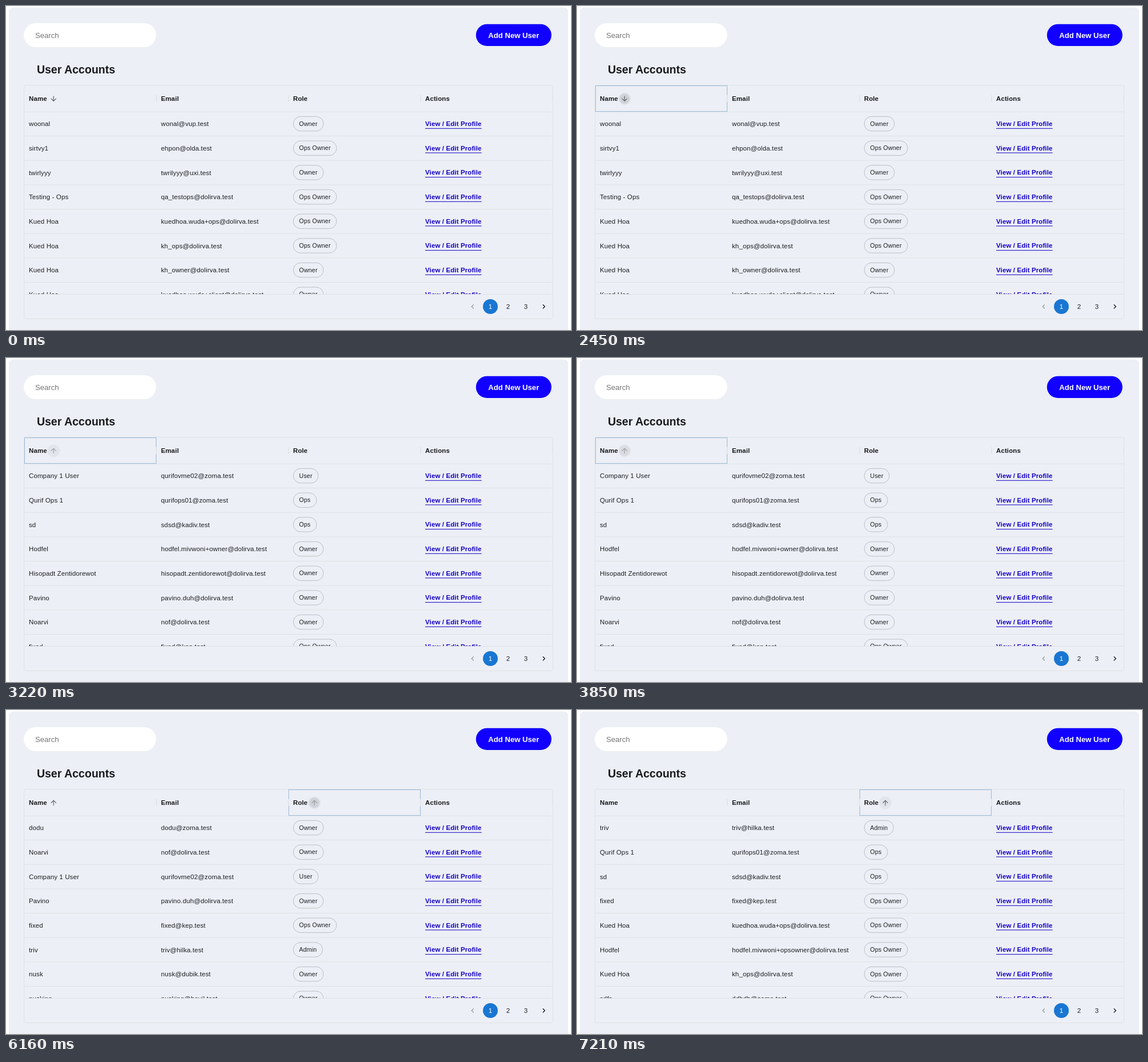
These frames come from a looping animation (988x567 px, 8 s). An HTML page:

```html
<!DOCTYPE html>
<html lang="en">
<head>
<meta charset="utf-8">
<title>User Accounts</title>
<style>
  html, body { margin: 0; width: 100%; height: 100%; overflow: hidden; background: #fff; }
  svg { display: block; width: 988px; height: 567px; }
  text { font: 11.49px "Liberation Sans", Arial, sans-serif; letter-spacing: .123px; fill: #1d1f22; }
  .bold { font-weight: 700; fill: #17191c; }
  .plain { letter-spacing: 0; }
  .title { font-size: 19.5px; }
  .large { font-size: 13.13px; }
  .label { font-size: 10.67px; }
  .link { font-weight: 700; fill: #1400c6; }
  .mid { text-anchor: middle; }
  .line { stroke: #dfe2e6; fill: none; }
  .chip { stroke: #bcbfc4; fill: none; }
  .focus { stroke: #9dbad9; fill: none; }
  .chevron { fill: none; stroke-width: 1.4; }
</style>
</head>
<body>
<svg id="stage" viewBox="0 0 988 567"></svg>
<script>
const LOOP = 8000, TICK = 70;
const COLUMNS = { name: 40, email: 271, role: 502, actions: 733 };
const ROW_TOP = 185.2, ROW_STEP = 42.67;
const CHIP_WIDTH = { Owner: 53, 'Ops Owner': 76, Ops: 41, User: 44, Admin: 51.5 };
const ARROW = 'M4 12l1.41 1.41L11 7.83V20h2V7.83l5.58 5.59L20 12l-8-8-8 8z';
const SEPARATORS = 'M263 156v12M494 156v12M725 156v12M956 156v12';

const org = user => user + '@dolirva.test';
const mail = user => user + '@zoma.test';
const people = {
  woonal: ['woonal', 'wonal@vup.test', 'Owner'],
  sirt: ['sirtvy1', 'ehpon@olda.test', 'Ops Owner'],
  twirl: ['twirlyyy', 'twrilyyy@uxi.test', 'Owner'],
  testing: ['Testing - Ops', org('qa_testops'), 'Ops Owner'],
  kuedOps: ['Kued Hoa', org('kuedhoa.wuda+ops'), 'Ops Owner'],
  khOps: ['Kued Hoa', org('kh_ops'), 'Ops Owner'],
  khOwner: ['Kued Hoa', org('kh_owner'), 'Owner'],
  kuedClient: ['Kued Hoa', org('kuedhoa.wuda+client'), 'Owner'],
  company: ['Company 1 User', mail('qurifovme02'), 'User'],
  qurif: ['Qurif Ops 1', mail('qurifops01'), 'Ops'],
  sd: ['sd', 'sdsd@kadiv.test', 'Ops'],
  hodfel: ['Hodfel', org('hodfel.mivwoni+owner'), 'Owner'],
  hodfelOps: ['Hodfel', org('hodfel.mivwoni+opsowner'), 'Ops Owner'],
  hisopadt: ['Hisopadt Zentidorewot', org('hisopadt.zentidorewot'), 'Owner'],
  pavino: ['Pavino', org('pavino.duh'), 'Owner'],
  noarvi: ['Noarvi', org('nof'), 'Owner'],
  fixed: ['fixed', 'fixed@kep.test', 'Ops Owner'],
  dodu: ['dodu', mail('dodu'), 'Owner'],
  triv: ['triv', 'triv@hilka.test', 'Admin'],
  nusk: ['nusk', 'nusk@dubik.test', 'Owner'],
  nusking: ['nusking', 'nusking@hovil.test', 'Owner'],
  sdfs: ['sdfs', mail('ddbdb'), 'Ops Owner']
};

// Each ordering of the table and the time it takes over
const orders = [
  [0, 'woonal sirt twirl testing kuedOps khOps khOwner kuedClient'],
  [2520, 'company qurif sd hodfel hisopadt pavino noarvi fixed'],
  [3990, 'dodu noarvi company pavino fixed triv nusk nusking'],
  [6230, 'triv qurif sd fixed kuedOps hodfelOps khOps sdfs']
];

// [time, value] steps, blended linearly
const tracks = {
  nameArrow: [[2450, 1], [2520, .5], [3920, .5], [4200, 1], [6160, 1], [6300, 0]],
  roleArrow: [[5390, 0], [5530, .5], [6160, .5], [6370, 1]],
  nameHover: [[1400, 0], [1470, .04], [4830, .04], [4900, 0]],
  roleHover: [[5670, 0], [5740, .04], [8000, .04]],
  nameRipple: [[2170, 0], [2310, .07], [2450, .08], [2800, 0], [3780, 0], [3920, .07], [4130, 0]],
  roleRipple: [[5950, 0], [6090, .07], [6160, .08], [6510, 0]],
  rowHover: [[4970, 0], [5040, .035], [5390, .035], [5530, 0]]
};

function valueAt(track, t) {
  const next = track.findIndex(step => step[0] > t);
  if (next === 0) return track[0][1];
  if (next < 0) return track[track.length - 1][1];
  const [t0, a] = track[next - 1], [t1, b] = track[next];
  return a + (b - a) * (t - t0) / (t1 - t0);
}

const text = (x, y, s, cls = '') => `<text x="${x}" y="${y}" class="${cls}">${s}</text>`;
const rect = (x, y, w, h, r, attrs) => `<rect x="${x}" y="${y}" width="${w}" height="${h}" rx="${r}" ${attrs}/>`;
const path = (d, attrs) => `<path d="${d}" ${attrs}/>`;

function row(key, i) {
  const [name, email, role] = people[key];
  const y = ROW_TOP + i * ROW_STEP, base = y + 25;
  return text(COLUMNS.name, base, name) + text(COLUMNS.email, base, email)
    + rect(502.4, y + 8.2, CHIP_WIDTH[role] - .3, 25.4, 12.7, 'class="chip"')
    + text(512.6, base - .6, role, 'label')
    + text(COLUMNS.actions, base - .3, 'View / Edit Profile', 'link')
    + rect(COLUMNS.actions, y + 28.6, 98.6, 1, 0, 'fill="#1400c6"')
    + path(`M32 ${y + 42.3}H956`, 'class="line"');
}

function sorter(id, x) {
  return `<g transform="translate(${x} 162.3)">
    <circle id="${id}Hover" r="11"/><circle id="${id}Ripple" r="9"/>
    <g id="${id}Arrow" fill="#66686c"><path id="${id}Icon" d="${ARROW}"/></g></g>`;
}

const heading = (x, s) => text(x, 166.3, s, 'bold');
const lists = orders.map(([, keys], i) => `<g id="list${i}">${keys.split(' ').map(row).join('')}</g>`);

document.getElementById('stage').innerHTML = `
  <clipPath id="body"><rect x="31" y="185" width="926" height="319"/></clipPath>
  ${rect(5, 2.5, 978, 580, 8, 'fill="#eceff5"')}
  ${rect(31, 30, 231.5, 42, 21, 'fill="#fff"')}
  ${text(51, 55.5, 'Search', 'large plain" style="fill:#757575')}
  ${rect(821.8, 31.8, 132, 38.2, 19.1, 'fill="#1100ff"')}
  ${text(887.8, 55.7, 'Add New User', 'bold large plain mid" style="fill:#fff')}
  ${text(53.9, 118, 'User Accounts', 'bold title plain')}
  ${rect(31.5, 138.5, 925, 409, 3.3, 'class="line"')}
  ${path('M32 185.2H956M32 504.5H956', 'class="line"')}
  ${rect(32.5, 139.5, 230, 45, 0, 'class="focus" id="nameFocus"')}
  ${rect(494.5, 139.5, 230, 45, 0, 'class="focus" id="roleFocus"')}
  ${path(SEPARATORS, 'stroke="#eceff5" stroke-width="3"')}
  ${path(SEPARATORS, 'class="line" style="stroke:#d8dbdf"')}
  ${sorter('name', 83.2)}${sorter('role', 539.2)}
  ${heading(COLUMNS.name, 'Name')}${heading(COLUMNS.email, 'Email')}
  ${heading(COLUMNS.role, 'Role')}${heading(COLUMNS.actions, 'Actions')}
  <g clip-path="url(#body)">${rect(32, 185.7, 924, 41.5, 0, 'id="rowHover"')}${lists.join('')}</g>
  ${path('M817.7 522.6l-3.4 3.4 3.4 3.4', 'class="chevron" stroke="#9b9ea3"')}
  <circle cx="847" cy="526" r="13" fill="#1976d2"/>
  ${text(847, 530.2, '1', 'mid" style="fill:#fff')}
  ${text(878, 530.2, '2', 'mid')}${text(909, 530.2, '3', 'mid')}
  ${path('M938.8 522.6l3.4 3.4-3.4 3.4', 'class="chevron" stroke="#1d1f22"')}`;

const el = id => document.getElementById(id);
const show = (id, on) => el(id).setAttribute('visibility', on ? 'visible' : 'hidden');
const turnIcon = (id, down) =>
  el(id).setAttribute('transform', `scale(.615) rotate(${down ? 180 : 0}) translate(-12 -12)`);

function draw(t) {
  for (const id in tracks) el(id).setAttribute('opacity', valueAt(tracks[id], t));
  const current = orders.filter(order => order[0] <= t).length - 1;
  orders.forEach((_, i) => show('list' + i, i === current));
  show('nameFocus', t >= 1470 && t < 6020);
  show('roleFocus', t >= 6020);
  turnIcon('nameIcon', t < 2520);
  turnIcon('roleIcon', false);
}

const start = performance.now();
function tick() {
  const t = (performance.now() - start) % LOOP;
  draw(Math.floor(t / TICK) * TICK);
  requestAnimationFrame(tick);
}
tick();
</script>
</body>
</html>
```
